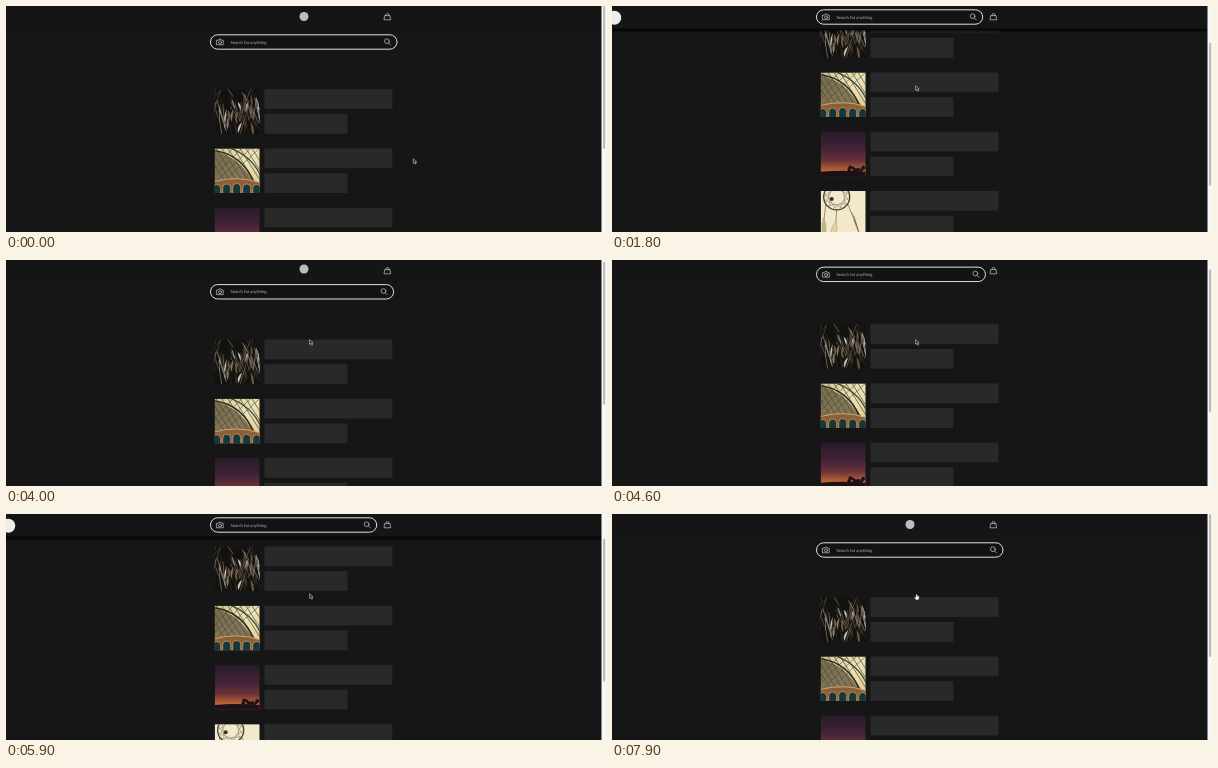
These frames come from a looping animation (600 px wide and 226 px high, 8 s). An HTML page:

```html
<!DOCTYPE html>
<html lang="en">
<head>
<meta charset="utf-8">
<title>Collapsing search header</title>
<style>
  html, body { margin: 0; width: 100%; height: 100%; overflow: hidden; background: #161616; }
  svg { display: block; width: 100vw; height: 100vh; }
  text { font-family: Lato, "Open Sans", sans-serif; font-size: 4.25px; fill: #b0b0b0; text-rendering: geometricPrecision; }
  .line { fill: none; stroke: #d6d6d6; stroke-width: .65; stroke-linejoin: round; stroke-linecap: round; }
</style>
</head>
<body>
<svg viewBox="0 0 600 226">
  <defs>
    <clipPath id="frame"><rect width="45" height="44.6"/></clipPath>
    <linearGradient id="dusk" x2="0" y2="1">
      <stop offset="0" stop-color="#271b2a"/>
      <stop offset=".4" stop-color="#432338"/>
      <stop offset=".65" stop-color="#6b3338"/>
      <stop offset=".87" stop-color="#b96336"/>
    </linearGradient>
    <linearGradient id="sky" x2="1" y2="1">
      <stop offset="0" stop-color="#d6c48c"/>
      <stop offset=".5" stop-color="#efe3b4"/>
      <stop offset="1" stop-color="#e2c48a"/>
    </linearGradient>
    <linearGradient id="fade" x2="0" y2="1">
      <stop offset="0" stop-color="#000" stop-opacity="0"/>
      <stop offset=".35" stop-color="#000" stop-opacity=".75"/>
      <stop offset="1" stop-color="#000" stop-opacity="0"/>
    </linearGradient>
  </defs>

  <rect width="600" height="226" fill="#161616"/>
  <g id="list"></g>

  <rect width="595.5" height="24" fill="#151515"/>
  <rect id="shadow" y="21.5" width="595.5" height="6" fill="url(#fade)"/>
  <circle id="midLogo" cx="298" r="4.5" fill="#bdbdbd"/>
  <circle id="sideLogo" cy="11.7" r="7" fill="#ededed"/>

  <g id="search">
    <rect id="pill" x="204.5" y="-7.2" height="14.4" rx="7.2" fill="#131313" stroke="#e0e0e0"/>
    <g class="line">
      <path d="M210.8-1.7h1.4l.8-1.1h2l.8 1.1h1.4v4.5h-6.4z"/>
      <circle cx="214" cy=".4" r="1.5"/>
    </g>
    <text x="224.4" y="1.5">Search for anything</text>
    <g id="lens" class="line"><circle cx="-.5" cy="-.8" r="2.4"/><path d="M1.3 1l1.9 1.9"/></g>
  </g>
  <path class="line" d="M379 9.6h5l.6 4.2h-6.2zM380.1 9.6v-.7a1.4 1.4 0 0 1 2.8 0v.7"/>

  <rect x="595.5" width="4.5" height="226" fill="#f7f7f7"/>
  <rect id="thumb" x="597" width="2.2" height="143" rx="1.1" fill="#bdbdbd"/>

  <path id="arrow" d="M0 0v4.6l1.1-1 .9 1.9.9-.4-.9-1.9h1.5z" fill="#111" stroke="#e8e8e8" stroke-width=".55"/>
  <path id="hand" d="M-.8-2.2h.9v1.4l1.7.4v1.7l-.6 1.2h-2.2l-1.2-1.6.5-.6.9.5z" fill="#fff" stroke="#ddd" stroke-width=".5"/>
</svg>
<script>
const LOOP = 8000, STEP = 100, COLLAPSE = 22, REVEAL = 25;
const $ = id => document.getElementById(id);
const clamp = v => Math.min(1, Math.max(0, v));
const set = (id, attrs) => { for (const k in attrs) $(id).setAttribute(k, attrs[k]); };
const at = (x, y) => `translate(${x} ${y})`;
const path = (d, stroke, width, fill = 'none') =>
  `<path d="${d}" fill="${fill}" stroke="${stroke}" stroke-width="${width}"/>`;
const fillRect = fill => `<rect width="45" height="44.6" fill="${fill}"/>`;

let seed = 11;
const rnd = (a, b) => {
  seed = (seed * 16807) % 2147483647;
  return a + (b - a) * seed / 2147483647;
};
const repeat = (n, f) => Array.from({ length: n }, (_, i) => f(i)).join('');

function feathers() {
  const tones = ['#5b5148', '#857d74', '#c4c0b8', '#33291f', '#6b5638'];
  const plume = i => {
    const x = rnd(0, 45), y = rnd(6, 34), h = rnd(8, 17), w = rnd(1, 2.6), lean = rnd(-4, 4);
    return path(`M${x} ${y}q${w + lean} ${h / 2} ${lean} ${h}q${-w} ${-h / 2} ${-lean} ${-h}`,
      'none', 0, tones[i % 5]);
  };
  const thread = i => {
    const x = rnd(0, 45);
    return path(`M${x} ${rnd(-4, 30)}l${rnd(-9, 9)} ${rnd(8, 24)}`, tones[i % 5], rnd(.3, .8));
  };
  return fillRect('#14120f') + repeat(36, plume) + repeat(44, thread);
}

function arches() {
  const spoke = i => path(`M${-12 + i * 6} -2L${12 + i * 6} 36`, '#3d4a40', .7);
  const rib = i => path(`M-2 ${22 + i * 7}L${20 + i * 9} -2`, '#4d4a36', .6);
  const arch = i => {
    const x = -2 + i * 10, y = 36 + Math.abs(i - 2) * .5;
    return path(`M${x} 46V${y + 3}a4 4 0 0 1 8 0V46z`, '#d09a60', .8, '#14383b');
  };
  return fillRect('url(#sky)')
    + path('M0 3Q25 8 38 33H0z', 'none', 0, 'rgba(62,48,28,.6)')
    + repeat(9, spoke) + repeat(4, rib)
    + path('M-1 2Q28 6 39 34', '#2b2d24', 1.6)
    + path('M14 -1Q38 8 46 28', '#2a4744', 1.2)
    + path('M0 33Q23 27 45 34V45H0z', 'none', 0, '#8d5f38')
    + path('M0 33Q23 27 45 34', '#d9ad6c', .9)
    + repeat(5, arch);
}

function sunset() {
  const leaf = () =>
    `<circle cx="${rnd(25, 43)}" cy="${rnd(35.5, 39.5)}" r="${rnd(1, 2.3)}" fill="#1d1117"/>`;
  return fillRect('url(#dusk)')
    + path('M0 40Q22 38 45 40V45H0z', 'none', 0, '#1d1117') + repeat(13, leaf);
}

function dreamcatcher() {
  const web = i => {
    const a = i * Math.PI / 6, b = a + 1.9;
    const p = v => `${16 + 13 * Math.cos(v)} ${6 + 13 * Math.sin(v)}`;
    return path(`M${p(a)}L${p(b)}`, '#55504a', .35);
  };
  const plume = (x, y, lean, tone) =>
    path(`M${x} ${y}q4 8 ${lean} 20q-5 -9 ${-lean} -20`, '#85705a', .3, tone);
  return fillRect('#f1e9c9')
    + `<circle cx="16" cy="6" r="13" fill="none" stroke="#423c38" stroke-width="1.3"/>`
    + repeat(12, web) + `<circle cx="11" cy="8" r="2" fill="#37312e"/>`
    + path('M5 14L3 31M16 19L15 34M27 13L32 25', '#6b4c3a', .6)
    + plume(3, 27, 1, '#c7b487') + plume(15, 30, -3, '#e0d2a4')
    + plume(31, 21, 7, '#b89d74') + path('M33 25l5 16', '#8b3f2c', .7);
}

$('list').innerHTML = [feathers, arches, sunset, dreamcatcher].map((draw, i) =>
  `<g transform="${at(208.7, 83.2 + i * 59.25)}">
    <g clip-path="url(#frame)">${draw()}</g>
    <rect x="49.7" width="128" height="19.7" fill="#292929"/>
    <rect x="49.7" y="24.8" width="83" height="19.7" fill="#292929"/>
  </g>`).join('');

// Scroll offset: [time, px], joined by a monotone cubic.
const keys = [[0, 0], [400, 0], [1300, 26], [1800, 76], [2200, 89], [2500, 84], [2900, 60],
  [3100, 32], [3800, 0], [3900, 0], [4000, 3.7], [4800, 25], [5300, 48], [5650, 55],
  [6000, 48], [6500, 25], [7300, 0], [8000, 0]];
const rate = i => (keys[i + 1][1] - keys[i][1]) / (keys[i + 1][0] - keys[i][0]);
const slope = i => {
  if (i < 1 || i > keys.length - 2) return 0;
  const a = rate(i - 1), b = rate(i);
  return a * b > 0 ? 2 * a * b / (a + b) : 0;
};

function scrollAt(t) {
  const i = keys.findIndex((k, n) => n && t <= k[0]) - 1;
  const [t0, a] = keys[i], [t1, b] = keys[i + 1];
  const d = t1 - t0, u = (t - t0) / d, v = 1 - u;
  return a * v * v * (1 + 2 * u) + b * u * u * (3 - 2 * u)
    + d * u * v * (slope(i) * v - slope(i + 1) * u);
}

function render(t) {
  const s = scrollAt(t);
  const p = clamp(s / COLLAPSE), q = clamp((s - REVEAL) / 15);
  const right = 391 - 20.3 * p;

  set('list', { transform: at(0, -s) });
  set('search', { transform: at(0, 36 - 25 * p) });
  set('pill', { width: right - 204.5 });
  set('lens', { transform: at(right - 9.6, 0) });
  set('midLogo', { cy: 10.5 - 22 * p ** 1.5 });
  set('sideLogo', { cx: -8 + 10.3 * q });
  set('shadow', { opacity: q });
  set('thumb', { y: s * .485 });

  const move = clamp(t / 200), over = t >= 7500;
  set('arrow', { transform: at(407.3 - 103.7 * move, 152.7 - 73 * move), opacity: over ? 0 : 1 });
  set('hand', { transform: at(305, 83), opacity: over ? 1 : 0 });
}

const start = performance.now();
function tick() {
  const t = (performance.now() - start) % LOOP;
  render(Math.floor(t / STEP) * STEP);
  requestAnimationFrame(tick);
}
tick();
</script>
</body>
</html>
```
